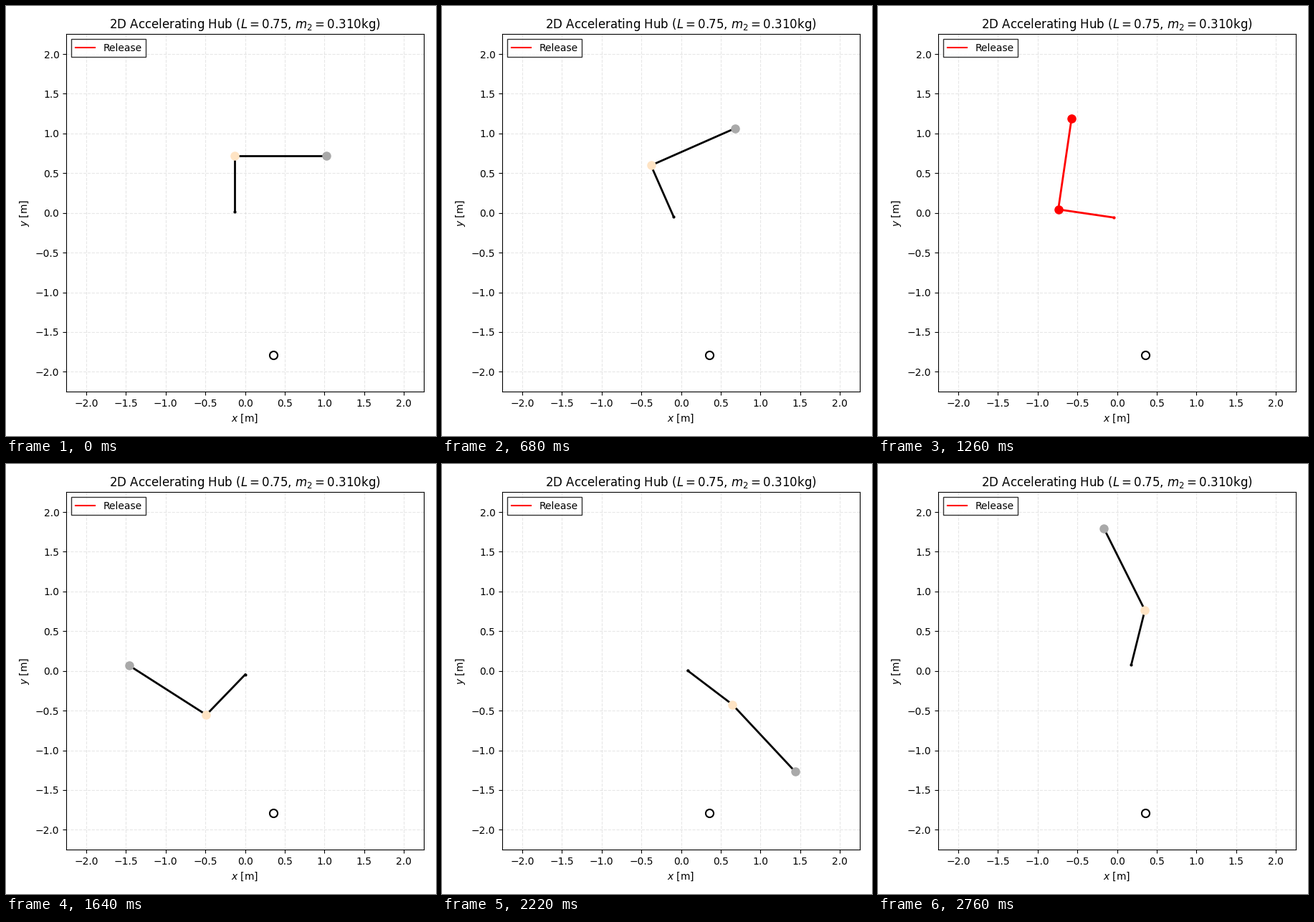
Recreate the animation shown at these times as a matplotlib script. Size 600x600 px, loop 2780 ms.

```python
import numpy as np
import matplotlib.pyplot as plt
from matplotlib.animation import FuncAnimation

FRAMES, STEP = 139, 20          # frame count, ms per frame
L1, L2 = 0.705, 1.153           # arm lengths
T_REL = 1.26                    # release time, s
ALPHA = 102.9                   # angular acceleration before release, deg/s^2

# After release: time, angle and rate of each arm (deg, deg/s)
KNOTS = np.array([T_REL, 1.64, 1.98, 2.16, 2.44, 2.76])
INNER = ([81.7, 136.0, 191.8, 222.3, 274.8, 346.0],
         [129.7, 155, 170, 172, 203, 246])
OUTER = ([81.7, 147.4, 236.9, 293.5, 384.5, 476.6],
         [129.7, 218, 303, 325, 318, 255])


def hermite(t, values, rates):
    k = int(np.clip(np.searchsorted(KNOTS, t) - 1, 0, len(KNOTS) - 2))
    h = KNOTS[k + 1] - KNOTS[k]
    s = (t - KNOTS[k]) / h
    return ((1 + 2 * s) * (1 - s) ** 2 * values[k]
            + s * (1 - s) ** 2 * h * rates[k]
            + s * s * (3 - 2 * s) * values[k + 1]
            + s * s * (s - 1) * h * rates[k + 1])


def angle(t, arm):
    if t <= T_REL:
        return np.radians(0.5 * ALPHA * t * t)
    return np.radians(hermite(t, *arm))


def pose(t):
    """Hub, elbow and tip positions."""
    a, b = angle(t, INNER), angle(t, OUTER)
    hub = np.array([-0.130 + 0.0335 * t + 0.0285 * t * t,
                    0.012 - 0.1232 * t + 0.0536 * t * t])
    elbow = hub + L1 * np.array([-np.sin(a), np.cos(a)])
    tip = elbow + L2 * np.array([np.cos(b), np.sin(b)])
    return hub, elbow, tip


plt.rcParams["font.family"] = "DejaVu Sans"
fig = plt.figure(figsize=(6, 6), dpi=100)
ax = fig.add_axes([84.18 / 600, 61.9 / 600, 498.8 / 600, 498.8 / 600])
ax.set(xlim=(-2.25, 2.25), ylim=(-2.25, 2.25), xlabel="$x$ [m]", ylabel="$y$ [m]")
ticks = np.arange(-2, 2.1, 0.5)
ax.set_xticks(ticks)
ax.set_yticks(ticks)
ax.set_title("2D Accelerating Hub ($L=0.75$, $m_2=0.310$kg)")
ax.grid(ls="--", alpha=0.3)

ax.plot([], [], "r-", label="Release")
ax.plot(0.355, -1.787, "o", ms=8, mfc="white", mec="black", mew=1.5)
arms, = ax.plot([], [], lw=2)
dots = [ax.plot([], [], "o", ms=size)[0] for size in (2, 8, 8)]
COLORS = ("black", "bisque", "darkgray")
ax.legend(loc="upper left", fancybox=False, edgecolor="black")


def update(i):
    t = i * STEP / 1000
    points = pose(t)
    released = abs(t - T_REL) < 0.03
    arms.set_data(*zip(*points))
    arms.set_color("red" if released else "black")
    for dot, (x, y), color in zip(dots, points, COLORS):
        dot.set_data([x], [y])
        dot.set_color("red" if released else color)
    return [arms, *dots]


anim = FuncAnimation(fig, update, frames=FRAMES, interval=STEP,
                     repeat=True, repeat_delay=0)
plt.show()
```
